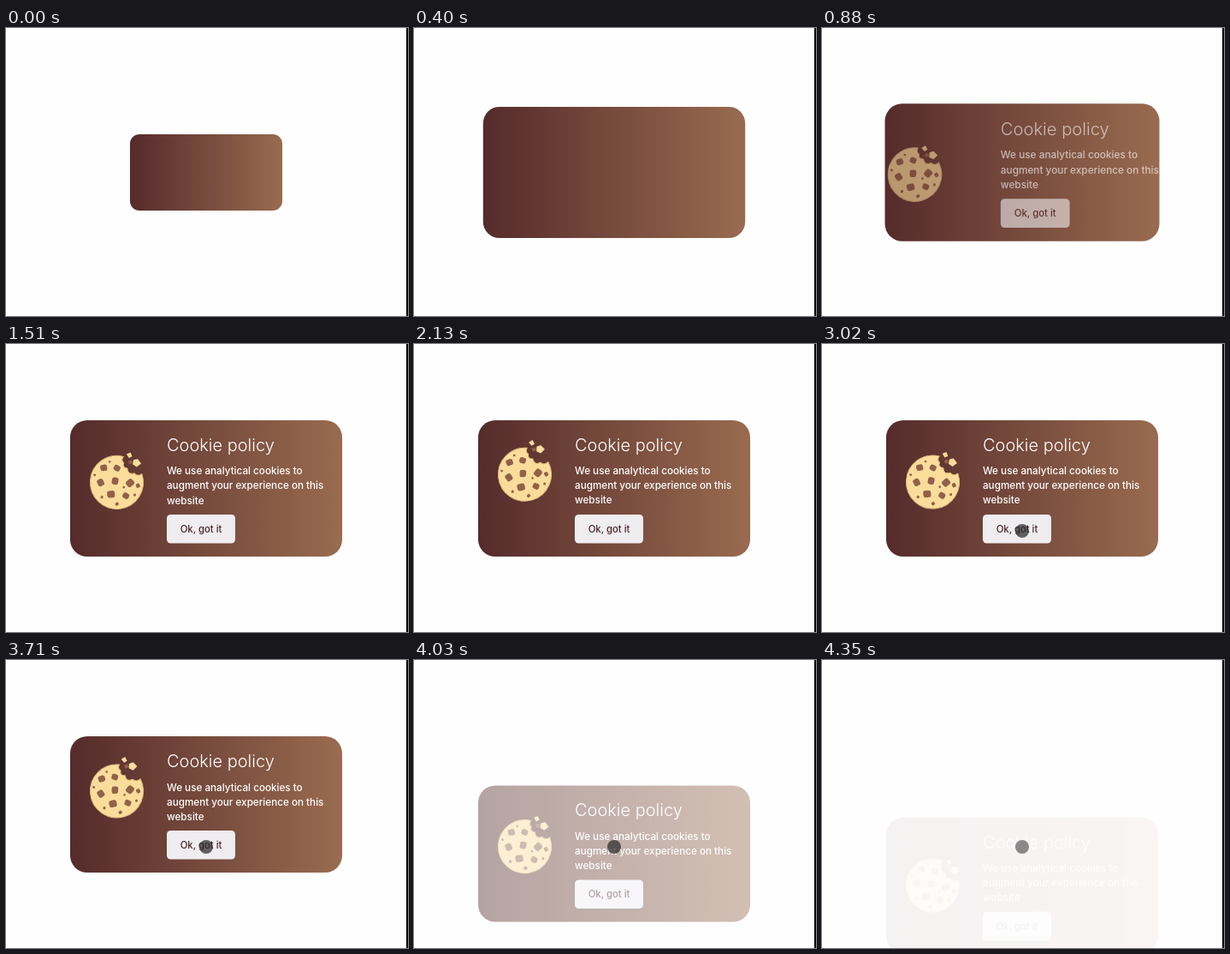
An HTML page that plays this animation: 470 by 336 pixels, repeating every 4.51 s.

```html
<!DOCTYPE html>
<html lang="en">
<head>
<meta charset="utf-8">
<title>Cookie policy</title>
<style>
  html, body { margin: 0; width: 100%; height: 100%; overflow: hidden; background: #fefefe; }
  svg { display: block; }
  text { font: 500 11.7px Poppins, Inter, sans-serif; fill: #fff; }
  text.title { font-size: 20px; font-weight: 300; }
  text.label { font-size: 11.3px; fill: #4a2626; }
</style>
</head>
<body>
<svg width="470" height="336" viewBox="0 0 470 336">
  <defs>
    <linearGradient id="brown">
      <stop stop-color="#552b2b"/>
      <stop offset="1" stop-color="#996b4f"/>
    </linearGradient>
  </defs>
  <g id="card">
    <rect x="75" y="89" width="318" height="159" rx="20" fill="url(#brown)"/>
    <g id="cookie">
      <path fill="#fadd9b" stroke="#e6c080" d="M13-28.2A31 31 0 1 0 30.7-4.5Q25-2 22-7Q14-6 15-14Q9-16 12-21Q9-25 13-28.2Z"/>
      <g id="chips" fill="#91614a"></g>
      <g id="crumbs" fill="#fadd9b">
        <path d="M17-27l5-1 1 5-4 1z"/>
        <path d="M24-19l5 0 3 6-6 3-4-4z"/>
        <path fill="#91614a" d="M18-19l4 0 0 4-4 0z"/>
      </g>
    </g>
    <g id="copy">
      <text class="title" x="188" y="125">Cookie policy</text>
      <text x="188" y="152.5">We use analytical cookies to</text>
      <text x="188" y="169.5">augment your experience on this</text>
      <text x="188" y="186.5">website</text>
      <rect x="188" y="199" width="80" height="33.5" rx="4.5" fill="#efedf0"/>
      <text class="label" x="228" y="220" text-anchor="middle">Ok, got it</text>
    </g>
  </g>
  <circle id="pointer" r="8" fill="#2d2d2d"/>
  <rect x="468" width="2" height="336"/>
</svg>
<script>
const LOOP = 4510, LAST = 4350, TWEEN = 750;
const $ = id => document.getElementById(id);
const set = (id, attrs) => {
  for (const key in attrs) $(id).setAttribute(key, attrs[key]);
};
const clamp = v => Math.min(1, Math.max(0, v));
const easeOut = v => 1 - (1 - v) ** 2;
const easeInOut = v => v * v * (3 - 2 * v);
const elastic = v => 1 - 2 ** (-10 * v) * Math.cos(v * Math.PI * 5);
const tween = (t, start) => easeOut(clamp((t - start) / TWEEN));

// Chocolate chips: x, y, radius
const chips = [
  [-12, -19, 4], [3, -16, 3.8], [-19, -3, 4.2], [-2, -2, 4.2], [15, 3, 4.5],
  [-9, 12, 4.5], [8, 17, 3.8], [24, 8, 2.5], [-20, 14, 1.6], [-4, 25, 2],
  [-4, -25, 1.3], [-24, -13, 1.4], [7, 7, 1.3], [18, 18, 1.5]
];
$('chips').innerHTML = chips.map(([x, y, r], i) =>
  `<rect x="${x - r}" y="${y - r}" width="${2 * r}" height="${1.8 * r}" rx="${r * 0.6}" transform="rotate(${i * 37} ${x} ${y})"/>`
).join('');

function draw(t) {
  const scale = elastic((t + 82) / 1500);
  const leave = tween(t, 3770);
  set('card', {
    transform: `translate(234 ${168.5 + 100 * leave}) scale(${scale}) translate(-234 -168.5)`,
    opacity: 1 - leave
  });

  const enter = tween(t, 604);
  const phase = Math.max(0, t - 1290) / TWEEN % 2;
  const hop = easeOut(phase > 1 ? 2 - phase : phase);
  set('cookie', {
    transform: `translate(${129.5 - 50 * (1 - enter)} ${171 - 19 * hop}) rotate(${-45 * (1 - enter) - 20 * hop})`,
    opacity: enter
  });
  set('crumbs', { transform: `translate(0 ${-7 * hop})` });
  set('copy', { transform: `translate(${53 * (1 - enter)} 0)`, opacity: enter });

  const move = easeInOut(clamp((t - 2650) / 310));
  set('pointer', {
    cx: 32 + 202 * move,
    cy: 200 + 18 * move,
    opacity: t < 2650 ? 0 : 0.74 - 0.2 * clamp((t - 4100) / 250)
  });
}

const origin = performance.now();
function frame() {
  draw(Math.min((performance.now() - origin) % LOOP, LAST));
  requestAnimationFrame(frame);
}
frame();
</script>
</body>
</html>
```
